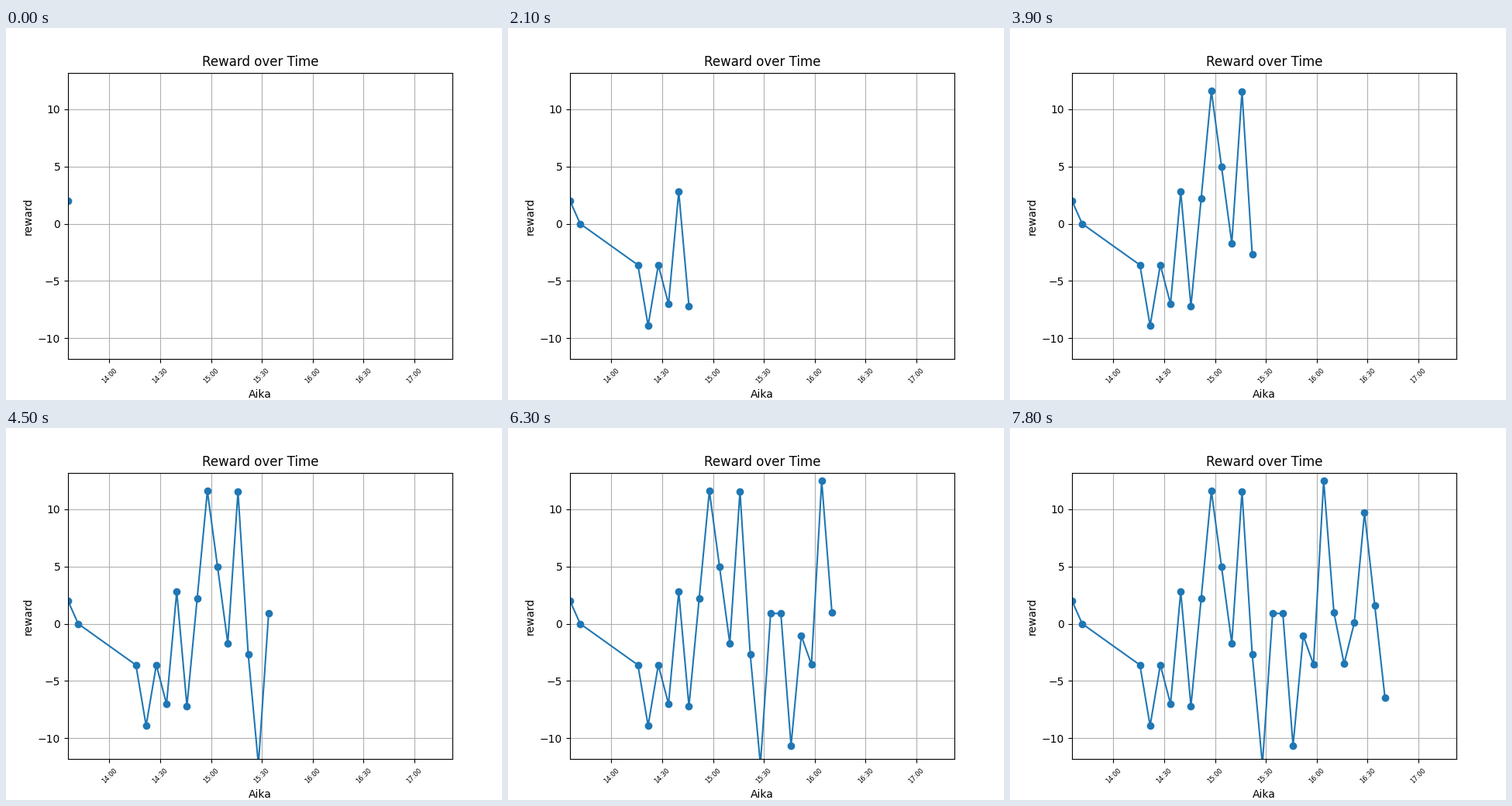
A matplotlib script for the animation above (8000 ms loop, 640 px wide and 480 px high).

```python
import matplotlib.pyplot as plt
import numpy as np
from matplotlib.animation import FuncAnimation

INTERVAL = 100          # ms per animation frame
FRAMES = 80
FRAMES_PER_POINT = 3    # a new sample appears every 300 ms

START = 13 * 60 + 35.58  # minutes since midnight
SPAN = 226.83
STEP = 6.025             # sampling period in minutes
GAP = 34.04              # pause after the second sample

MID = np.nan             # sample halfway between its neighbours


def fill_mids(values):
    index = np.arange(len(values))
    known = ~np.isnan(values)
    return np.interp(index, index[known], values[known])


def clock(minutes):
    return f"{minutes // 60:02d}:{minutes % 60:02d}"


rewards = fill_mids(np.array([
    2, 0, -3.6, -8.9, -3.6, -7, 2.8, -7.2, MID, 11.6, MID, -1.7, 11.55,
    -2.65, -12.3, 0.9, 0.9, -10.65, -1.05, -3.55, 12.5, 1, -3.5, 0.1,
    9.7, MID, -6.45,
]))
steps = np.full(len(rewards), STEP)
steps[0], steps[2] = 0, GAP
times = START + np.cumsum(steps)

fig, ax = plt.subplots(figsize=(6.4, 4.8), dpi=100)
line, = ax.plot([], [], marker="o", color="C0")

ax.set_xlim(START, START + SPAN)
ax.set_ylim(-11.82, 13.2)
ticks = range(14 * 60, 17 * 60 + 1, 30)
ax.set_xticks(ticks, [clock(t) for t in ticks], rotation=45, fontsize=6)
ax.set_yticks(range(-10, 11, 5))
ax.set_title("Reward over Time")
ax.set_xlabel("Aika")
ax.set_ylabel("reward")
ax.grid(True)


def update(frame):
    count = frame // FRAMES_PER_POINT + 1
    line.set_data(times[:count], rewards[:count])
    return line,


anim = FuncAnimation(fig, update, frames=FRAMES, interval=INTERVAL,
                     repeat=True, repeat_delay=0)
plt.show()
```
